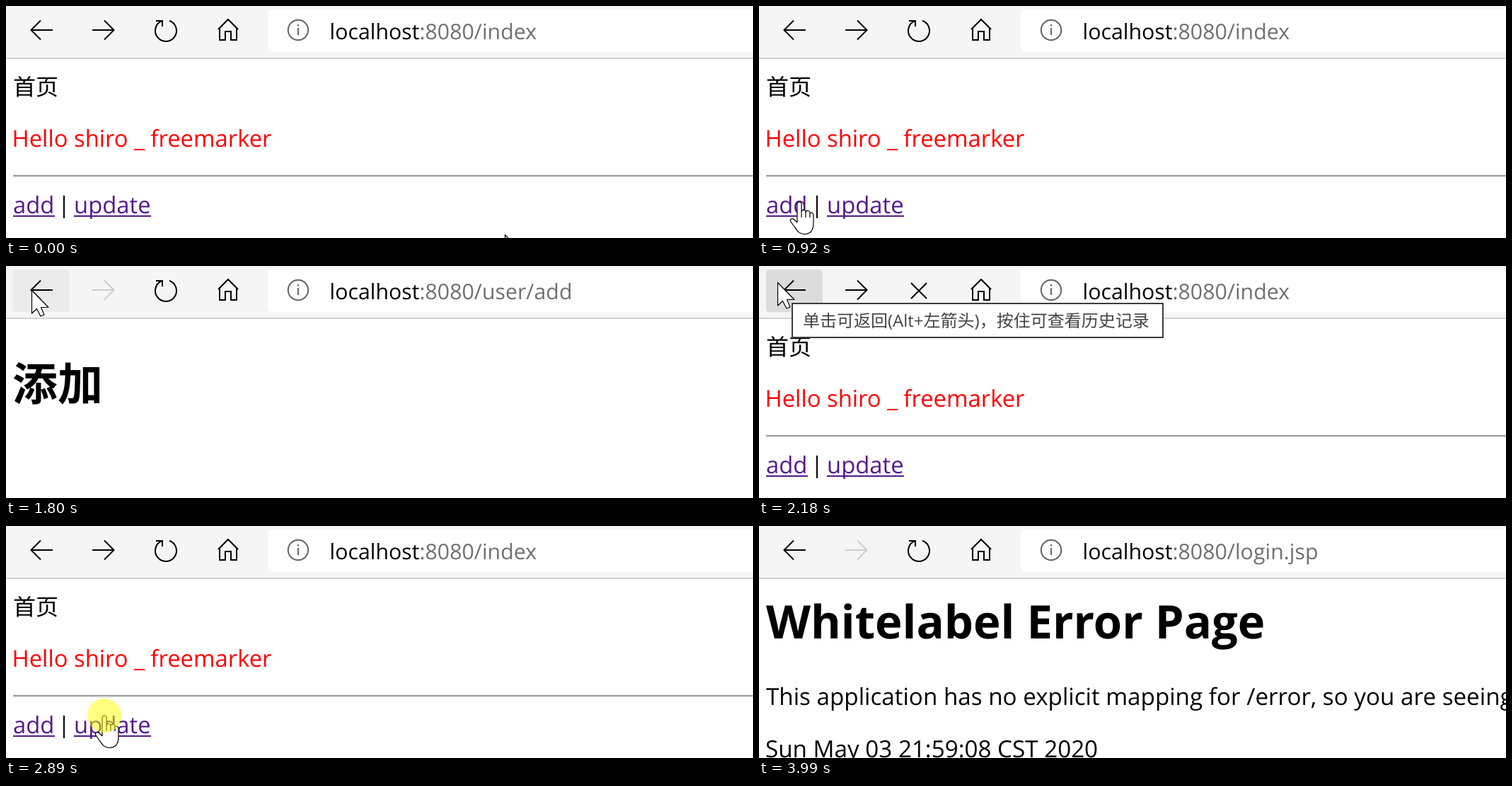
These frames come from a looping animation (1056 px wide and 328 px high, 4450 ms). An HTML page:

```html
<!DOCTYPE html>
<html lang="zh-CN">
<head>
<meta charset="utf-8">
<style>
  html, body { margin: 0; width: 100%; height: 100%; overflow: hidden; background: #fff; }
  svg { display: block; }
  text { font: 32.8px "Open Sans", "Noto Sans CJK SC", "Noto Sans CJK", sans-serif; white-space: pre; text-rendering: geometricPrecision; }
  .cjk { font-size: 32px; }
  .title { font-weight: 700; font-size: 65.2px; }
  .title.cjk { font-size: 64px; }
  .url { font-size: 30.3px; }
  .message { font-size: 33.2px; }
  .tip { font-size: 24px; }
  .icon { fill: none; stroke: #000; stroke-width: 2; }
  .link { fill: #551a8b; }
</style>
</head>
<body>
<svg width="1056" height="328" viewBox="0 0 1056 328">
  <rect width="1056" height="328" fill="#fff"/>
  <rect width="1056" height="73" fill="#f5f5f5"/>
  <rect y="73" width="1056" height="2" fill="#d2d2d2"/>
  <rect id="hover" x="10" y="5" width="80" height="60" rx="4"/>
  <rect x="370" y="5" width="700" height="60" rx="6" fill="#fff"/>

  <g class="icon">
    <path d="M66 34H35M49 20.500L35.500 34L49 47.500"/>
    <path id="forward" d="M122 34H153M139 20.500L152.500 34L139 47.500"/>
    <path id="reload" d="M231 20.800A15 15 0 1 1 220 21.200M212 21H221V29"/>
    <path id="stop" d="M215 24L237 46M237 24L215 46"/>
    <path d="M300 33L314 19L328 33M302 31V48H310V36H318V48H326V31"/>
    <g stroke="#666"><circle cx="413" cy="34" r="14.200"/><path d="M413 26V28.500M413 31V41"/></g>
  </g>
  <text class="url" x="457.500" y="47">localhost<tspan id="path" fill="#707070"></tspan></text>

  <g id="index">
    <text class="cjk" x="10" y="126">首页</text>
    <text x="8.500" y="199" fill="#f00">Hello shiro _ freemarker</text>
    <path d="M10 240H1056" stroke="#9a9a9a" stroke-width="2"/>
    <path d="M10 242H1056" stroke="#eee" stroke-width="2"/>
    <g class="link">
      <text x="10" y="293">add</text><rect x="10" y="296" width="59" height="2"/>
      <text x="96" y="293">update</text><rect x="96" y="296" width="109" height="2"/>
    </g>
    <path d="M82 268V300" stroke="#000" stroke-width="2"/>
  </g>
  <g id="add"><text class="title cjk" x="9" y="190">添加</text></g>
  <g id="error">
    <text class="title" x="10" y="159">Whitelabel Error Page</text>
    <text class="message" x="10" y="253">This application has no explicit mapping for /error, so you are seeing this</text>
    <text class="message" x="9" y="327">Sun May 03 21:59:08 CST 2020</text>
  </g>

  <g id="tooltip">
    <rect x="47" y="53" width="524" height="48" fill="#fff" stroke="#3c3c3c" stroke-width="2"/>
    <text class="tip" x="62" y="86" fill="#444">单击可返回(Alt+左箭头)，按住可查看历史记录</text>
  </g>

  <g id="cursor" fill="#fff" stroke="#000" stroke-width="1.200" stroke-linejoin="round">
    <path id="arrow" d="M.5 .5V33L7.500 26.500L13 37L18 35L13.500 24.500H24Z"/>
    <path id="hand" d="M-3 29V3a3 3 0 0 1 6 0V14a3 3 0 0 1 6 1a3 3 0 0 1 6 1a3 3 0 0 1 5 2V30C20 38 17 45 8 45.500C0 46 -3 41 -7 35L-12 28C-14 24 -10 22.500 -7 25L-3 29M3 14V22M9 15V22M15 16V22"/>
    <circle id="click" r="24" fill="#ff0" fill-opacity=".5" stroke="none"/>
  </g>
</svg>
<script>
const LOOP = 4450;
const $ = id => document.getElementById(id);
const show = (id, on) => $(id).style.display = on ? '' : 'none';
const paths = { index: ':8080/index', add: ':8080/user/add', error: ':8080/login.jsp' };

// Pointer moves: first step, last step, step count, end point, vertical bow
const moves = [
  [70, 120, 2, 432, 288, 0],
  [300, 610, 5, 60, 280, -32],
  [920, 920, 1, 57, 277, 0],
  [1160, 1320, 3, 91, 149, 0],
  [1470, 1800, 5, 36, 34, 0],
  [1860, 1950, 2, 26, 23, 0],
  [2270, 2600, 5, 139, 259, 0],
  [2660, 2740, 2, 139, 268, 0],
  [3530, 3990, 7, 890, 330, -74]
];

function pointer(t) {
  let x = 705, y = 323;
  for (const [start, end, steps, toX, toY, bow] of moves) {
    if (t < start) break;
    const done = t >= end ? steps : 1 + Math.floor((t - start) / (end - start) * (steps - 1));
    const k = done / steps;
    x += (toX - x) * k;
    y += (toY - y) * k + 4 * bow * k * (1 - k);
  }
  return [x, y];
}

function draw(t) {
  const during = (a, b) => t >= a && t < b;
  const page = during(1080, 2180) ? 'add' : t >= 3050 ? 'error' : 'index';
  const loading = during(1080, 1160) || during(2180, 2270) || during(3050, 3120);
  const [x, y] = pointer(t);
  const onLink = y > 255 && y < 300 && (x > 10 && x < 69 || x > 96 && x < 205);

  for (const name in paths) show(name, name === page);
  $('path').textContent = paths[page];
  $('forward').style.stroke = page === 'index' ? '#000' : '#ccc';
  show('reload', !loading);
  show('stop', loading);
  show('hover', x > 10 && x < 90 && y < 65);
  $('hover').style.fill = during(2100, 2270) ? '#dcdcdc' : '#ebebeb';
  show('tooltip', during(2180, 2270));
  $('cursor').setAttribute('transform', `translate(${x} ${y})`);
  show('cursor', t < 3990);
  show('hand', onLink);
  show('arrow', !onLink);
  show('click', during(1000, 1080) || during(2100, 2180) || during(2890, 2970));
}

const began = performance.now();
function tick() {
  draw((performance.now() - began) % LOOP);
  requestAnimationFrame(tick);
}
tick();
</script>
</body>
</html>
```
